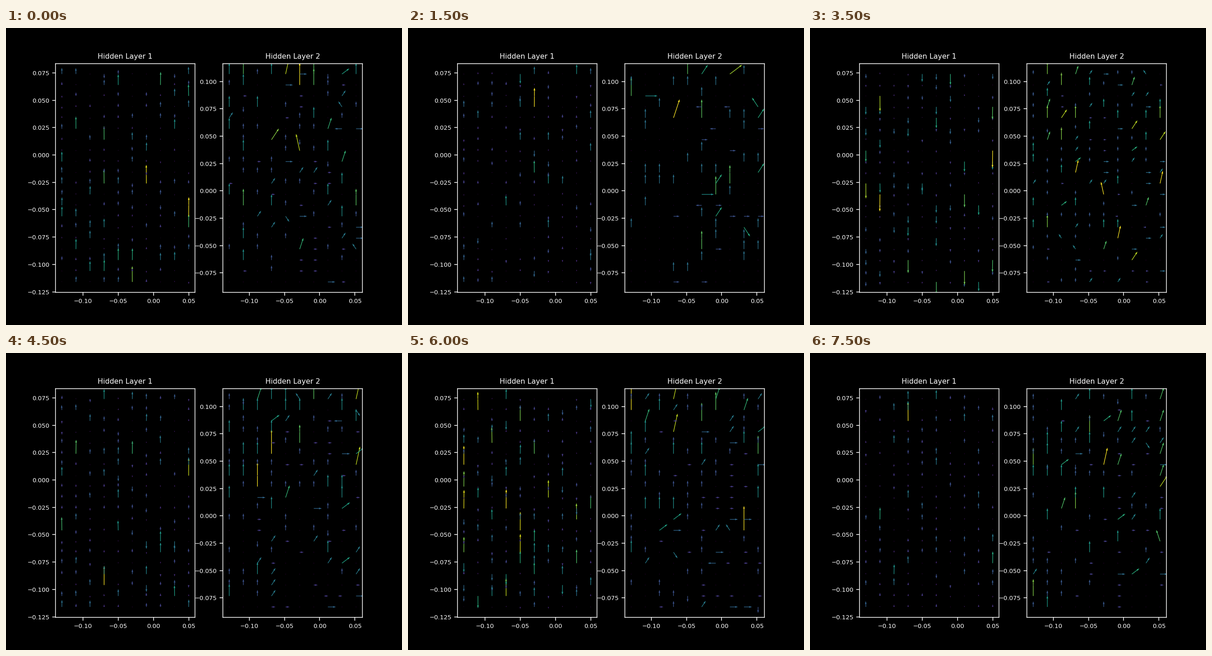
Animation of 864 by 648 pixels, one loop 8000 ms. Source, as a matplotlib script:

```python
import numpy as np
import matplotlib.pyplot as plt
from matplotlib.animation import FuncAnimation

FRAMES, STEP_MS = 16, 500
COLS, ROWS = 10, 20
SHAPE = ROWS, COLS
PANEL_W = 304.36  # panel width in px, so arrow lengths are in px
LONGEST = 42

# Key steps: share of upward arrows in layer 1, px per count in layer 2
KEYS = [0, 3, 5, 7, 9, 12, 15]
UP_SHARE = [0.85, 0.62, 0.64, 0.1, 0.76, 0.66, 0.85]
UNIT = [12.2, 20.2, 14.4, 9.2, 13.3, 13.3, 12.4]

row, col = np.mgrid[0:ROWS, 0:COLS]


def signs(rng, share):
    return np.where(rng.random(SHAPE) < share, 1, -1)


def layer_1(k):
    """Almost vertical arrows of any length, mostly along one direction."""
    rng = np.random.default_rng(100 + k)
    share = np.interp(k, KEYS, UP_SHARE)
    length = rng.gamma(1.3, size=SHAPE)
    length *= LONGEST / length.max()
    s = signs(rng, share)
    against = s != np.sign(share - 0.5)
    length[against] *= 0.3 + 1.2 * min(share, 1 - share)
    return rng.normal(0, 0.25, SHAPE), s * length


def layer_2(k):
    """Whole counts: more upward ones at the top, more sideways at the right."""
    rng = np.random.default_rng(200 + k)
    unit = np.interp(k, KEYS, UNIT)
    rate = 12.2 / unit
    lam_u = (0.08 + 0.46 * col / 9) * rate
    lam_v = (0.3 + 0.9 * row / 19) * (1 - 0.35 * col / 9) * rate
    v = np.minimum(rng.poisson(lam_v), round(48 / unit))
    u = np.minimum(rng.poisson(lam_u), np.where(v > 2, 1, 2))
    u = u * signs(rng, 0.94)
    v = v * np.where(v > 1, 1, signs(rng, 0.94))
    return u * unit * 0.66, v * unit


def make_panel(ax, title, x0, y0):
    x, y = x0 + 0.02 * col, y0 + 0.01 * row
    ax.set_title(title)
    ax.set_xlim(x0 - 0.009, x0 + 0.189)
    ax.set_ylim(y0 - 0.0095, y0 + 0.1995)
    ax.xaxis.set_major_locator(plt.MultipleLocator(0.05))
    ax.yaxis.set_major_locator(plt.MultipleLocator(0.025))
    for spine in ax.spines.values():
        spine.set_snap(False)
    zero = np.zeros(SHAPE)
    return ax.quiver(x, y, zero, zero, zero, cmap="viridis", units="width",
                     scale_units="width", scale=PANEL_W, width=0.00424)


plt.style.use("dark_background")
plt.rcParams.update({"font.family": "DejaVu Sans", "font.size": 7})
fig, (ax1, ax2) = plt.subplots(1, 2, figsize=(6.4, 4.8), dpi=135)
fig.subplots_adjust(left=0.125, right=0.9, bottom=0.11, top=0.88, wspace=0.2)
panels = [
    (make_panel(ax1, "Hidden Layer 1", -0.13, -0.116), layer_1),
    (make_panel(ax2, "Hidden Layer 2", -0.1284, -0.0832), layer_2),
]


def update(k):
    for arrows, field in panels:
        u, v = field(k)
        strength = np.abs(u) + np.abs(v)
        arrows.set_UVC(u, v, strength)
        arrows.set_clim(0, strength.max())
    return [arrows for arrows, _ in panels]


anim = FuncAnimation(fig, update, frames=FRAMES, interval=STEP_MS,
                     repeat=True, repeat_delay=0, blit=False)
plt.show()
```
